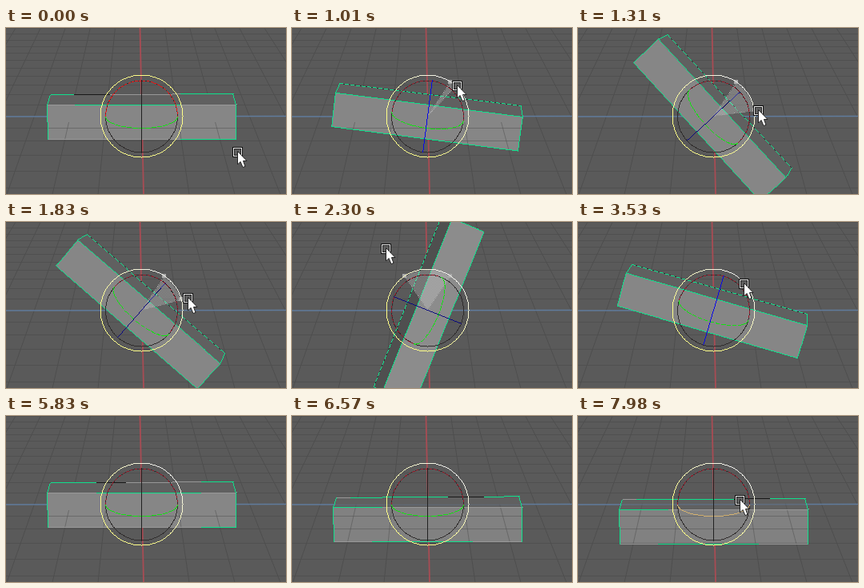
Recreate the animation shown at these times as an HTML page with a canvas. Size 350 by 208 pixels, loop 8000 ms.

```html
<!DOCTYPE html>
<html lang="en">
<head>
<meta charset="utf-8">
<title>Rotate gizmo</title>
<style>
html, body { margin: 0; width: 350px; height: 208px; overflow: hidden; background: #5a5a5a; }
canvas { display: block; }
</style>
</head>
<body>
<canvas id="stage" width="350" height="208"></canvas>
<script>
const c = document.getElementById('stage').getContext('2d');
const LOOP = 8000, CX = 169.5, CY = 110.5, RING = 51.5, INNER = 45, PRESS = -56;
const INK = { G: '#0fe08c', L: '#989898', K: '#181818' };
const rad = d => d * Math.PI / 180;
const mix = (a, b, p) => a + (b - a) * p;
const polar = (deg, r) => [CX + r * Math.cos(rad(deg)), CY + r * Math.sin(rad(deg))];

// Box corners relative to the pivot
const BOX = {
  bl: [-117, 28.5], br: [117.5, 28.5], fl: [-118, -14],
  fr: [118, -14.5], tl: [-114, -26.5], tr: [114, -28]
};
// Edge colours from left to right, each with the x where it ends
const START = {
  back: [[85, 'G'], [130, 'K'], [218, 'L'], [284, 'G']],
  front: [[86, 'L'], [218, 'G'], [288, 'L']],
  low: [[218, 'L'], [287, 'G']]
};
const RESET = {
  back: [[113, 'G'], [150, 'K'], [244, 'L'], [284, 'G']],
  front: [[113, 'L'], [244, 'G'], [288, 'L']],
  low: [[244, 'L'], [287, 'G']]
};
const MOVED = {
  back: [[73, 'L'], [195, 'G'], [240, 'K'], [284, 'G']],
  front: [[113, 'G'], [288, 'L']],
  low: [[100, 'L'], [226, 'G'], [287, 'L']]
};

const dots = document.createElement('canvas');
dots.width = dots.height = 2;
const dc = dots.getContext('2d');
dc.fillStyle = 'rgba(210,210,210,.6)';
dc.fillRect(0, 0, 1, 1);
dc.fillRect(1, 1, 1, 1);
const stipple = c.createPattern(dots, 'repeat');

// Progress over n equal hard steps; the first lands at a, the last at b
function steps(t, a, b, n) {
  if (t < a) return 0;
  return Math.min(n, Math.floor((t - a) * (n - 1) / (b - a) + 1e-6) + 1) / n;
}

// Turns a point about the pivot and places it on the stage
function place([x, y], ang, dy = 0) {
  const co = Math.cos(rad(ang)), si = Math.sin(rad(ang));
  return [CX + x * co - y * si, CY + dy + x * si + y * co];
}

// One-pixel line without smoothing
function crisp(points, color, on = 1, off = 0) {
  c.fillStyle = color;
  let count = 0;
  for (let i = 1; i < points.length; i++) {
    const [x, y] = points[i - 1], [u, v] = points[i];
    const n = Math.ceil(Math.max(Math.abs(u - x), Math.abs(v - y), 1));
    for (let k = 0; k <= n; k++) {
      if (count++ % (on + off) < on) {
        c.fillRect(Math.floor(mix(x, u, k / n)), Math.floor(mix(y, v, k / n)), 1, 1);
      }
    }
  }
}

function smooth(points, color, width = 1) {
  c.beginPath();
  points.forEach(p => c.lineTo(...p));
  c.strokeStyle = color;
  c.lineWidth = width;
  c.stroke();
}

function outline(points) {
  c.beginPath();
  points.forEach(p => c.lineTo(...p));
  c.closePath();
}

function fill(points, color) {
  outline(points);
  c.fillStyle = color;
  c.fill();
}

// Points of an elliptic arc about the pivot
function arc(rx, ry, from, to, ang = 0, dy = 0) {
  const points = [];
  for (let a = from; a <= to; a += 5) {
    points.push(place([rx * Math.cos(rad(a)), ry * Math.sin(rad(a))], ang, dy));
  }
  return points;
}

function drawGrid() {
  const horizon = -250, centre = y => 167.5 + y * 4.5 / 208;
  for (let n = -13; n <= 5; n++) {
    const y = Math.round(horizon + 360 / (1 - n * .04)) + .5;
    if (n) smooth([[0, y], [350, y]], '#505050');
  }
  for (let n = -8; n <= 8; n++) {
    const at = y => centre(y) + n * 46 * (y - horizon) / 370;
    if (n) smooth([[at(0), 0], [at(208), 208]], '#4e4e4e');
  }
  smooth([[0, 111], [350, 110.5]], '#607b9c', 1.6);
}

function splitEdge(a, b, parts) {
  let from = a;
  for (const [x, ink] of parts) {
    const to = [x, mix(a[1], b[1], (x - a[0]) / (b[0] - a[0]))];
    crisp([from, to], INK[ink]);
    from = to;
  }
}

function drawBox({ ang, dy, look }) {
  const [bl, br, fl, fr, tl, tr] = Object.values(BOX).map(p => place(p, ang, dy));
  const shade = Math.min(0, Math.sin(rad(ang)));
  const top = 96 + 18 * shade, face = 134 - 7 * shade - dy / 4;
  fill([fl, tl, tr, fr], `rgb(${top},${top},${top})`);
  fill([fl, fr, br, bl], `rgb(${face},${face},${face})`);

  // The part below the floor plane shows the grid through it
  if (Math.abs(ang) < 12) {
    c.save();
    outline([tl, tr, fr, br, bl, fl]);
    c.clip();
    c.beginPath();
    c.rect(0, 118 - dy / 2.5, 350, 100);
    c.clip();
    c.globalAlpha = .5;
    drawGrid();
    c.restore();
  }

  if (ang) {
    crisp([tl, tr], '#1d3a30');
    crisp([tl, tr], INK.G, 5, 2);
    crisp([fl, fr, br, bl], INK.G);
  } else {
    splitEdge(tl, tr, look.back);
    splitEdge(fl, fr, look.front);
    splitEdge(bl, br, look.low);
  }
  crisp([tl, fl, bl], INK.G);
  crisp([tr, fr, br], INK.G);
}

function drawPie(aim) {
  c.beginPath();
  c.moveTo(CX, CY);
  c.arc(CX, CY, RING - 1, rad(PRESS), rad(aim), aim < PRESS);
  c.closePath();
  c.fillStyle = stipple;
  c.fill();
  for (const a of [PRESS, aim]) {
    const [x, y] = polar(a, RING);
    crisp([[CX, CY], [x, y]], '#999', 1, 1);
    c.fillStyle = '#aaa';
    c.fillRect(Math.round(x) - 3, Math.round(y) - 3, 5, 5);
  }
}

function drawGizmo({ ang, bright, hover }) {
  crisp(arc(INNER, INNER, 0, 360, 0, .5), '#302d2d');
  crisp(arc(INNER, INNER, 180, 360, ang, .5), bright ? '#ee1010' : '#981828', 4, bright ? 2 : 3);
  crisp(arc(INNER, 14.5, 0, 180, ang, .5), hover ? '#d2b070' : '#12e212', 8, hover ? 0 : 2);
  const axis = !ang ? '#202020' : Math.abs(ang) > 30 ? '#0a0a80' : '#0808e8';
  crisp([place([0, -INNER], ang), place([0, INNER], ang)], axis);

  const glow = c.createLinearGradient(CX + 30, CY - 40, CX - 20, CY + 20);
  glow.addColorStop(0, bright ? '#ffff88' : '#f4f4ee');
  glow.addColorStop(1, '#ffff88');
  crisp(arc(RING, RING, 0, 360), glow);
}

function drawCursor([px, py]) {
  c.save();
  c.translate(Math.round(px), Math.round(py));
  ['#111', '#eee', '#222', '#606060'].forEach((color, i) => {
    c.fillStyle = color;
    c.fillRect(i - 6, i - 6, 13 - 2 * i, 13 - 2 * i);
  });
  const arrow = [[.5, -.5], [.5, 16], [4, 12.5], [7, 19.5], [10, 18.5], [7.5, 11.5], [12, 11.5]];
  fill(arrow, '#fff');
  smooth([...arrow, arrow[0]], '#222');
  c.restore();
}

function stateAt(t) {
  const s = { ang: 0, dy: 0, look: START, bright: t < 790, pie: t >= 790 && t < 3530 };
  let aim = PRESS, r = 52;
  if (t >= 2580) {
    const p = steps(t, 2580, 2960, 6);
    s.ang = mix(-68, 16.2, p);
    aim = mix(-124, -42, p);
    r = mix(93, 50, p);
  } else if (t >= 1660) {
    const p = steps(t, 1660, 2300, 10) ** 1.3;
    s.ang = mix(70, -68, p);
    aim = mix(14, -124, p);
    r = mix(58, 93, p * p);
  } else if (t >= 1010) {
    const p = steps(t, 1010, 1440, 7) ** 1.15;
    s.ang = mix(0, 70, p);
    aim = mix(-54, 14, p);
    r = mix(52, 58, p);
  }
  s.aim = aim;
  s.cursor = polar(aim, r);
  if (t < 350) {
    const p = steps(t, 60, 350, 5);
    s.cursor = [mix(289, s.cursor[0], p), mix(155, s.cursor[1], p)];
  }
  if (t >= 4220) s.ang = 0;
  if (t >= 4690) s.cursor = null;
  if (t >= 5830) s.look = RESET;
  if (t >= 6120) {
    s.look = MOVED;
    s.dy = 21 * steps(t, 6120, 6630, 8);
  }
  if (t >= 7640) {
    const p = steps(t, 7640, 7980, 6);
    s.cursor = [mix(350, 202, p), mix(172, 105, p)];
    s.hover = p === 1;
  }
  return s;
}

function draw(now) {
  const s = stateAt(now % LOOP);
  c.fillStyle = '#5a5a5a';
  c.fillRect(0, 0, 350, 208);
  drawGrid();
  smooth([[167.5, 0], [172, 208]], '#a84c54', 1.8);
  drawBox(s);
  if (s.pie) drawPie(s.aim);
  drawGizmo(s);
  if (s.cursor) drawCursor(s.cursor);
}

const began = performance.now();
function tick() {
  draw(performance.now() - began);
  requestAnimationFrame(tick);
}
tick();
</script>
</body>
</html>
```
